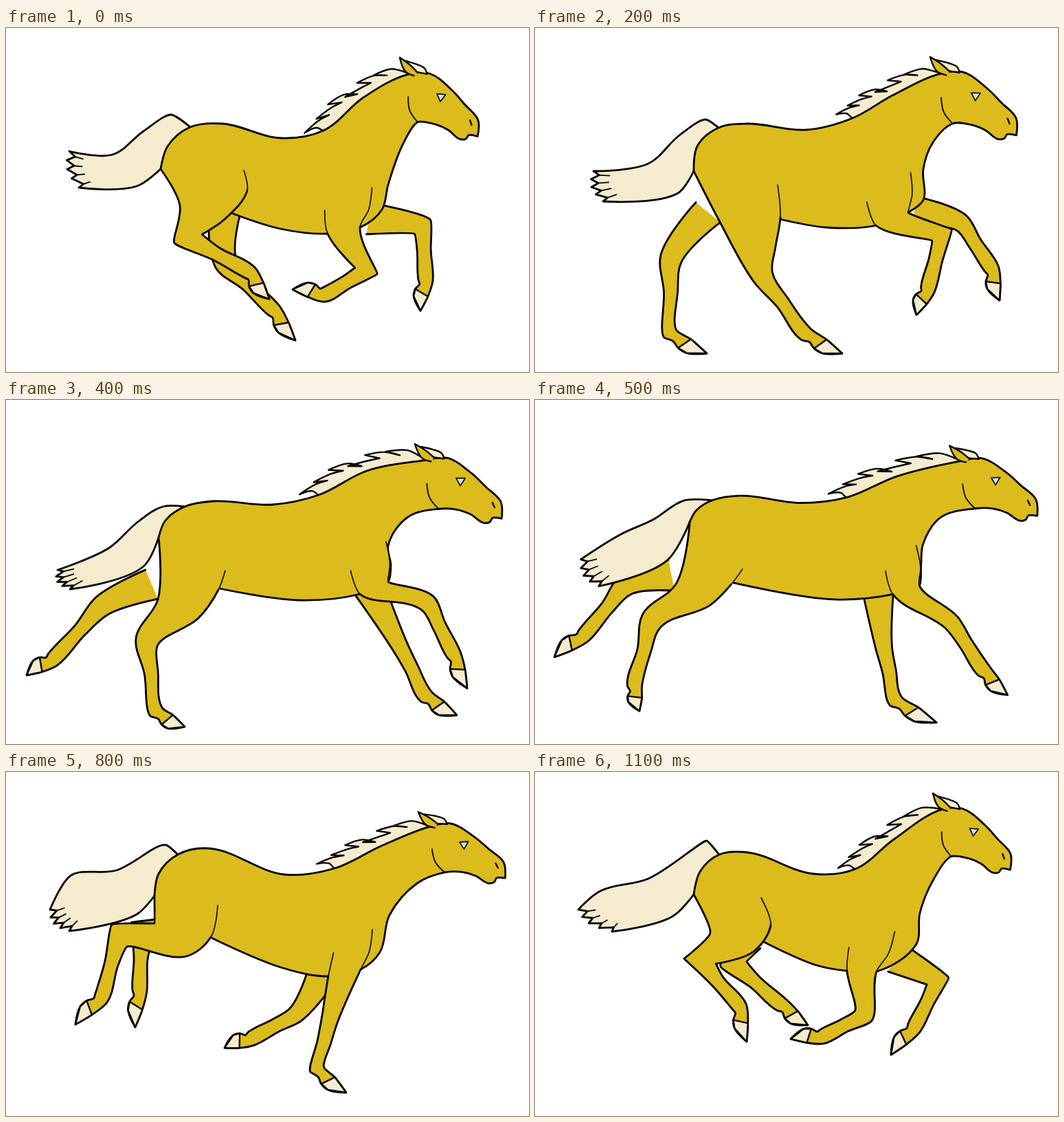
Recreate the animation shown at these times as an HTML page with a canvas. Size 761 by 500 pixels, loop 1200 ms.

```html
<!DOCTYPE html>
<html lang="en">
<head>
<meta charset="utf-8">
<title>Galloping horse</title>
<style>
html, body { margin: 0; width: 100%; height: 100%; overflow: hidden; background: #fff; }
canvas { display: block; }
</style>
</head>
<body>
<canvas id="stage" width="761" height="500"></canvas>
<script>
const COAT = '#dcbb1c', CREAM = '#f5ecd0', EYE = '#c4e4f4', INK = '#050400';
const STEP = 100, STEPS = 12, LINE = 2.8;
const ctx = document.getElementById('stage').getContext('2d');

// Key poses as joints:
// body: rump, hip, croup, loin, saddle, withers, crest, neck, chest, breast, elbow, belly, flank
// head: ear tip, nose     tail: hump, middle, low, upper tip, lower tip, underside
// hindNear: buttock, hock, fetlock, toe, stifle, crease, crease top
// foreNear: knee, fetlock, toe, chest     far legs: root, hock or knee, fetlock, toe
const poses = [
  {
    at: 0,
    body: '225,205 235,172 268,144 315,139 400,160 462,149 520,101 577,170 556,228 547,264 468,299 400,292 328,269',
    head: '573,43 687,134',
    tail: '240,126 200,150 155,184 92,179 106,232 190,230',
    hindNear: '253,258 265,306 355,355 383,394 318,278 351,236 346,207',
    hindFar: '318,270 320,342 390,410 421,454',
    foreNear: '524,353 463,388 417,380 515,290',
    foreFar: '528,277 606,289 611,367 603,411'
  },
  {
    at: 2,
    body: '231,208 236,172 267,145 308,139 395,148 462,131 520,98 578,168 565,205 565,250 496,287 425,290 357,278',
    head: '575,42 700,131',
    tail: '248,133 210,156 165,197 85,208 99,252 208,240',
    hindNear: '268,280 332,362 395,445 447,473 350,318 357,275 353,228',
    hindFar: '252,268 198,335 197,444 250,473',
    foreNear: '592,301 572,380 555,417 543,268',
    foreFar: '552,268 620,283 665,350 676,396'
  },
  {
    at: 4,
    body: '222,200 232,175 260,155 302,147 388,152 455,138 525,103 585,170 556,212 560,240 515,282 425,291 311,274',
    head: '595,64 720,148',
    tail: '228,155 192,177 150,215 75,247 93,275 200,242',
    hindNear: '221,290 205,351 219,453 260,475 280,317 309,276 319,248',
    hindFar: '212,268 140,299 68,378 30,400',
    foreNear: '613,295 652,370 671,419 556,264',
    foreFar: '528,272 571,354 612,431 656,458'
  },
  {
    at: 6,
    body: '228,158 236,146 255,134 295,128 390,147 455,144 530,117 595,170 572,208 562,240 518,285 440,288 275,256',
    head: '608,65 734,138',
    tail: '212,131 155,165 100,171 60,210 93,260 185,223',
    hindNear: '198,240 152,286 99,373 71,422 240,279 271,258 291,236',
    hindFar: '196,241 140,241 102,316 69,358',
    foreNear: '582,353 624,420 668,441 556,277',
    foreFar: '472,278 447,355 435,428 493,464'
  },
  {
    at: 8,
    body: '216,180 222,148 250,120 295,111 405,149 478,140 545,108 598,162 558,208 544,262 469,297 400,284 299,241',
    head: '600,58 724,131',
    tail: '232,106 160,143 95,150 64,200 92,231 190,207',
    hindNear: '216,220 165,238 139,329 101,367 262,268 298,240 308,194',
    hindFar: '240,235 197,234 195,318 188,371',
    foreNear: '471,360 453,432 495,466 516,287',
    foreFar: '462,290 422,352 357,388 318,401'
  },
  {
    at: 10,
    body: '220,172 232,140 256,119 300,114 395,150 463,146 525,106 580,175 555,225 541,275 443,295 385,276 320,243',
    head: '580,39 703,122',
    tail: '250,97 185,140 110,158 54,175 106,222 195,207',
    hindNear: '239,233 206,257 234,343 229,396 300,264 326,222 320,181',
    hindFar: '280,245 258,268 300,342 324,387',
    foreNear: '450,357 382,402 345,423 484,302',
    foreFar: '505,287 520,347 453,394 408,400'
  },
  {
    at: 11,
    body: '231,178 240,145 268,120 310,117 405,148 466,141 522,98 580,156 560,205 555,250 454,289 410,281 333,247',
    head: '579,31 692,119',
    tail: '250,100 165,155 95,173 63,200 112,232 200,210',
    hindNear: '255,234 240,275 298,341 308,392 318,261 343,222 329,183',
    hindFar: '308,245 289,279 359,338 397,368',
    foreNear: '478,354 418,385 372,388 497,290',
    foreFar: '525,270 586,304 552,372 518,411'
  }
];

const parse = s => s.split(' ').map(p => p.split(',').map(Number));
const parts = Object.keys(poses[0]).filter(k => k !== 'at');
for (const pose of poses) for (const k of parts) pose[k] = parse(pose[k]);

// One head for all poses, measured from the nose.
const skull = {
  face: parse('-107,-60 -77,-63 -42,-41 -21,-21 0,0 1,24 -12,23 -16,29 -25,30 -43,18 -63,11 -89,10'),
  ear: parse('-100,-58 -113,-63 -123,-83 -108,-74 -95,-63'),
  lock: parse('-115,-79 -97,-75 -85,-70 -81,-62 -98,-64'),
  jaw: parse('-106,-26 -102,-6 -89,10'),
  eye: parse('-64,-34 -51,-34 -58,-23'),
  nostril: parse('-12,1 -9,8')
};

// Pose at a whole step: a key pose, or a Hermite blend of its neighbours.
function poseAt(step) {
  const n = poses.length;
  const i = poses.findLastIndex(p => p.at <= step);
  const key = j => poses[(j + n) % n];
  const time = j => key(j).at + STEPS * Math.floor(j / n);
  const span = time(i + 1) - time(i), u = (step - time(i)) / span;
  const mix = (a, b, c, d) => {
    const m1 = span * (c - a) / (time(i + 1) - time(i - 1));
    const m2 = span * (d - b) / (time(i + 2) - time(i));
    return b + (c - b) * u * u * (3 - 2 * u) + u * (1 - u) * ((1 - u) * m1 - u * m2);
  };
  const out = {};
  for (const k of parts) {
    out[k] = key(i)[k].map((p, q) => p.map((_, c) =>
      mix(...[-1, 0, 1, 2].map(o => key(i + o)[k][q][c]))));
  }
  return out;
}

const add = (a, b) => [a[0] + b[0], a[1] + b[1]];
const dot = (a, b) => a[0] * b[0] + a[1] * b[1];
const dist = (a, b) => Math.hypot(b[0] - a[0], b[1] - a[1]);
const toward = (a, b, t) => a.map((v, c) => v + (b[c] - v) * t);
const unit = (a, b) => {
  const d = dist(a, b) || 1;
  return [(b[0] - a[0]) / d, (b[1] - a[1]) / d];
};
const between = (a, b) => unit([0, 0], add(a, b));
// Step along a direction and out to its rear side.
const place = (p, d, along, side) =>
  [p[0] + d[0] * along - d[1] * side, p[1] + d[1] * along + d[0] * side];

// Smooth open curve through the points; sharp turns stay corners.
function curve(pts, from = 0, to = pts.length - 1) {
  const tangent = i => {
    if (i === 0 || i === pts.length - 1) return [0, 0];
    const a = unit(pts[i - 1], pts[i]), b = unit(pts[i], pts[i + 1]);
    const k = Math.min(1, Math.max(0, dot(a, b) * 1.4));
    return between(a, b).map(v => v * k);
  };
  const path = new Path2D();
  path.moveTo(...pts[from]);
  for (let i = from; i < to; i++) {
    const p = pts[i], q = pts[i + 1], h = dist(p, q) / 3;
    const s = tangent(i), e = tangent(i + 1);
    path.bezierCurveTo(p[0] + s[0] * h, p[1] + s[1] * h, q[0] - e[0] * h, q[1] - e[1] * h, ...q);
  }
  return path;
}

function polygon(pts) {
  const path = new Path2D();
  pts.forEach(p => path.lineTo(...p));
  path.closePath();
  return path;
}

function paint(path, fill, width = LINE) {
  if (fill) { ctx.fillStyle = fill; ctx.fill(path); }
  ctx.lineWidth = width;
  ctx.stroke(path);
}

// Lower leg as an outline around its joints, down the rear and up the front.
function limb(root, joint, fetlock, toe, half) {
  const a = unit(root, joint), b = unit(joint, fetlock), c = unit(fetlock, toe);
  const bend = between(a, b), ankle = between(b, c), len = dist(fetlock, toe);
  const miter = half / Math.max(0.6, dot(a, bend));
  const cannon = toward(joint, fetlock, 0.45);
  const hoof = [[0.33, 13], [0.57, 13.5], [1, 0], [0.5, -7]].map(([t, s]) => place(fetlock, c, t * len, s));
  const outline = [
    place(joint, bend, 0, miter), place(cannon, b, 0, 10),
    place(fetlock, ankle, 0, 11), place(fetlock, c, 0.15 * len, 8),
    ...hoof,
    place(fetlock, ankle, 0, -10), place(cannon, b, 0, -10), place(joint, bend, 0, -miter)
  ];
  return { hoof, outline };
}

// The first "head" and last "tail" segments are thin creases on the body.
function drawLeg(rear, lower, front, head = 0, tail = 0) {
  const pts = [...rear, ...lower.outline, ...front];
  paint(curve(pts), COAT, 1.6);
  paint(curve(pts, head, pts.length - 1 - tail));
  paint(polygon(lower.hoof), CREAM, 2.4);
}

function farLeg([root, joint, fetlock, toe], half) {
  const d = unit(root, joint);
  drawLeg([place(root, d, 0, 23)], limb(root, joint, fetlock, toe, half), [place(root, d, 0, -23)]);
}

function hindLeg([buttock, hock, fetlock, toe, stifle, crease, top], rump) {
  const lower = limb(toward(buttock, stifle, 0.5), hock, fetlock, toe, 15);
  drawLeg([rump, buttock], lower, [stifle, crease, top], 0, 1);
}

function foreLeg([knee, fetlock, toe, chest], elbow) {
  const lower = limb(toward(elbow, chest, 0.5), knee, fetlock, toe, 12);
  const rearTop = add(elbow, [8 - 0.22 * (knee[0] - elbow[0]), -34]);
  const frontTop = add(chest, [(550 - chest[0]) / 2, -58]);
  const fold = add(toward(chest, frontTop, 0.5), [4, 3]);
  drawLeg([rearTop, elbow], lower, [chest, fold, frontTop], 1, 2);
}

function drawTail([hump, middle, low, upper, lower, under], rump, croup) {
  const heart = toward(low, under, 0.5), out = unit(heart, toward(upper, lower, 0.5));
  const hairs = 4, fringe = [], strands = [];
  for (let i = 0; i < hairs; i++) {
    const edge = t => add(toward(upper, lower, t), out.map(v => v * 10 * Math.sin(Math.PI * t)));
    const p = edge((i + 0.6) / hairs), notch = add(p, out.map(v => v * -11));
    fringe.push(edge(i / hairs), notch);
    strands.push([notch, toward(notch, heart, 0.16)]);
  }
  paint(curve([croup, hump, middle, low, ...fringe, lower, under, rump]), CREAM);
  for (const s of strands) paint(curve(s), null, 1.8);
}

// Locks of hair swept back along the neck line.
function drawMane(poll, crest, withers) {
  const neck = t => poll.map((v, c) =>
    v * (1 - t) * (1 - 2 * t) + crest[c] * 4 * t * (1 - t) + withers[c] * t * (2 * t - 1));
  const off = (t, h) => place(neck(t), unit(neck(t - 0.05), neck(t + 0.05)), 0, h);
  const pts = [poll, off(0.08, 11)];
  for (let i = 0; i < 6; i++) {
    const t = 0.23 + 0.165 * i, h = 20 + 4 * Math.sin(i * 2.4);
    pts.push(off(t - 0.09, h * 0.85), off(t + 0.08, h), off(t - 0.03, h * 0.55));
  }
  pts.push(withers, crest);
  paint(curve(pts), CREAM, 2.4);
}

function placeHead([ear, nose]) {
  const tip = skull.ear[2], base = Math.hypot(...tip);
  const turn = Math.atan2(ear[1] - nose[1], ear[0] - nose[0]) - Math.atan2(tip[1], tip[0]);
  const size = dist(ear, nose) / base, c = Math.cos(turn) * size, s = Math.sin(turn) * size;
  const out = {};
  for (const k in skull) out[k] = skull[k].map(([x, y]) => add(nose, [x * c - y * s, x * s + y * c]));
  return out;
}

function draw(p) {
  const head = placeHead(p.head);
  const [rump, , croup, , , withers, crest] = p.body, elbow = p.body[10];
  ctx.fillStyle = '#fff';
  ctx.fillRect(0, 0, 761, 500);
  farLeg(p.foreFar, 12);
  farLeg(p.hindFar, 15);
  drawTail(p.tail, rump, croup);
  drawMane(head.face[0], crest, withers);
  paint(curve([...p.body.slice(0, 7), ...head.face, ...p.body.slice(7, 10), p.foreNear[3], ...p.body.slice(10)]), COAT);
  hindLeg(p.hindNear, rump);
  foreLeg(p.foreNear, elbow);
  paint(curve(head.lock), CREAM, 2.4);
  paint(curve(head.ear), COAT, 2.4);
  paint(curve(head.jaw), null, 1.8);
  paint(polygon(head.eye), EYE, 1.6);
  paint(curve(head.nostril), null, 2.4);
}

const cycle = Array.from({ length: STEPS }, (_, i) => poseAt(i));
let shown = -1;

function tick(now) {
  const step = Math.floor(now / STEP) % STEPS;
  if (step !== shown) draw(cycle[shown = step]);
  requestAnimationFrame(tick);
}

ctx.strokeStyle = INK;
ctx.lineJoin = ctx.lineCap = 'round';
draw(cycle[0]);
requestAnimationFrame(tick);
</script>
</body>
</html>
```
